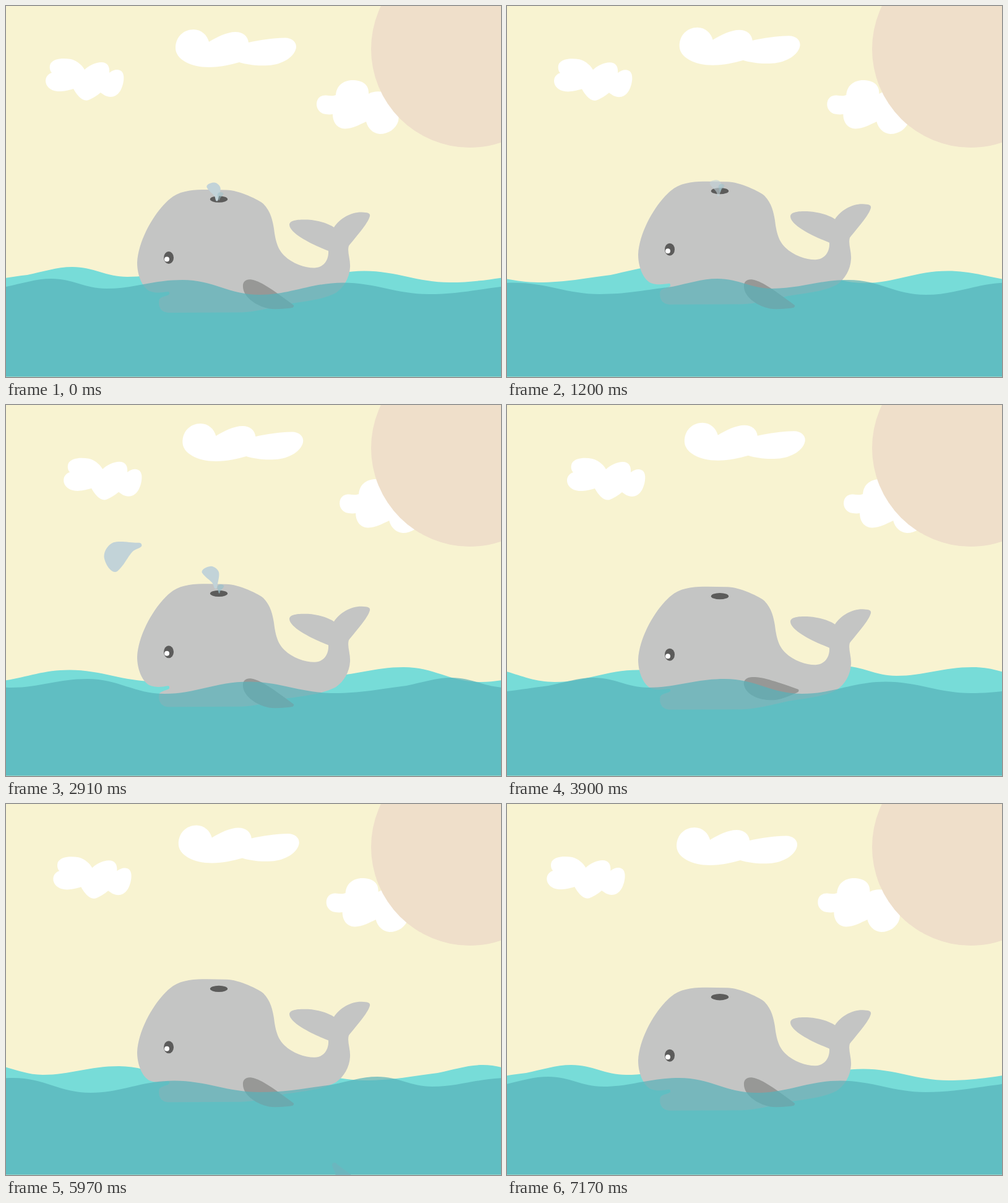
These frames come from a looping animation (800x600 px, 7200 ms). An HTML page:

```html
<!DOCTYPE html>
<html lang="en">
<head>
<meta charset="utf-8">
<title>Whale</title>
<style>
  html, body { margin: 0; height: 100%; overflow: hidden; background: #f8f3d1; }
  svg { display: block; width: 800px; height: 600px; }
</style>
</head>
<body>
<svg viewBox="0 0 800 600">
  <rect width="800" height="600" fill="#f8f3d1"/>
  <g fill="#fff">
    <path id="cloud1" d="M64,121C64,113 70,109 74,108C70,104 70,97 72,93C78,84 93,84 105,86C116,89 124,97 127,103C134,96 145,91 154,91C164,91 168,98 167,108C173,103 180,102 184,104C190,106 191,114 190,121C188,135 181,147 169,147C162,147 157,143 153,140C147,145 139,150 132,152.5C122,154 114,143 109,134C98,137 92,138.5 83,138C72,137 64,130 64,121Z"/>
    <path id="cloud2" d="M274,68C274,50 287,38 303,38C316,38 325,47 328,58C341,50 357,42 371,42C383,42 391,49 392,59C410,55 430,52 451,51.5C462,51.5 469,58 469,66C468,82 446,95 424,96C405,97 390,95 377,91C362,95 347,99 328,99C298,99 274,86 274,68Z"/>
    <path id="cloud3" d="M502,159C502,149 509,144 517,144.5C523,145 528,146 533,144C534,129 545,120 560,120C576,120 587,127 586,142C597,136 615,137 625,148C632,158 636,175 634,186C630,199 618,207 604,207C593,206 585,198 582,187C571,192 561,198 548,198.5C535,198 528,188 528,175C522,176 516,175 512,174C506,171 502,166 502,159Z"/>
  </g>
  <circle cx="749.5" cy="69.5" r="159.5" fill="#efdfca"/>
  <path id="back" fill="#77dcd8"/>
  <g id="whale">
    <path fill="#c4c5c4" d="M212,415C214,375 245,325 270,308C285,298 305,297 325,297L355,297.5C375,297 410,314 416,320C428,332 431,348 433,360C436,385 441,395 450,404C463,417 485,424 499,423.5C514,423 522,410 521,396C505,390 459,370 458,354C458,346 472,345 488,345.5C508,347 523,353 530,358C540,343 558,333 575,333.5C585,334 589,335 588,340C585,352 565,374 554,388C551,398 557,410 556,423C555,440 546,455 533,464C510,476 480,478 455,482C425,489 400,495 380,495.5L262,496C250,495 246,486 247.5,476C248,470 262,469 264,466Q264.5,462 262,462C252,463.5 242,465 232,461C220,455 212,435 212,415Z"/>
    <g fill="#5c5c5b">
      <ellipse cx="263" cy="407" rx="8" ry="10"/>
      <ellipse cx="344" cy="312.5" rx="14.2" ry="5.2"/>
    </g>
    <circle cx="260" cy="409.5" r="4" fill="#fff"/>
    <g id="spray"></g>
  </g>
  <path id="fin" fill="#979896" d="M383,454C382,445 389,441 397,442.5C410,445 425,454 465,484Q466,488 460,488.5C445,490 435,491 425,489.5C400,484 383,468 383,454Z"/>
  <path id="front" fill="#58b2ba" fill-opacity=".7"/>
</svg>
<script>
const LOOP = 7200;
const $ = id => document.getElementById(id);
const move = (el, x, y) => el.setAttribute('transform', `translate(${x} ${y})`);
const clamp = v => Math.max(0, Math.min(1, v));
// 0 -> 1 -> 0 in straight lines
const pingPong = (t, half) => 1 - Math.abs(1 - t / half % 2);

// One 800 px stretch of swell, repeated
const swell = 'c25,-5 48,-13 73,-13c35,0 54,16 89,16c45,0 74,-14 123,-14c50,0 75,24 125,24' +
  'c50,0 82,-19.5 135,-19.5c52,0 86,18.5 138,18.5c45,0 75,-7 117,-12';
const setWave = (id, bottom) =>
  $(id).setAttribute('d', `M-800,454${swell.repeat(3)}V${bottom}H-800Z`);
setWave('back', 618.5);
setWave('front', 599.5);

const DROP = 'M-1,45C-6,44 -2,33 -4,27C-7,18 -18,4 -21,-8C-24,-18 -8,-22 6,-19C16,-17 24,-4 23,6C21,18 8,33 4,43Q2,46 -1,45Z';
const jets = [
  { dir: -1, x: 339, reach: 365, life: 740, turn: 150, size: .36, fill: '#c2d3d8',
    starts: [-20, 1190, 2518, 2870, 3910, 5166, 6300] },
  { dir: 1, x: 346, reach: 205, life: 820, turn: 146, size: .16, fill: '#9cc1c9',
    starts: [-8, 1192, 2898, 3915, 5166, 6310] }
];
const drops = jets.flatMap(jet => jet.starts.map(start => {
  const el = document.createElementNS('http://www.w3.org/2000/svg', 'path');
  el.setAttribute('d', DROP);
  el.setAttribute('fill', jet.fill);
  $('spray').append(el);
  return { ...jet, start, el };
}));

function placeDrop({ el, dir, x, reach, life, turn, size, start }, t) {
  const age = t - start, p = age / life;
  const flying = p > 0 && p < 1.02;
  el.style.display = flying ? '' : 'none';
  if (!flying) return;
  const angle = 12 + turn * Math.sin(Math.min(p, 1) * Math.PI / 2) ** 1.2;
  const scale = Math.min(1, size + age * .0053);
  const px = x + dir * reach * p ** 1.3;
  const py = 312 - 630 * p + 978 * p * p;
  el.setAttribute('transform',
    `translate(${px} ${py}) rotate(${dir * angle}) scale(${-dir * scale} ${scale})`);
  el.setAttribute('opacity', clamp(age / 18));
}

function draw(now) {
  const t = now % LOOP;
  const drift = pingPong(t, 3600);
  move($('cloud1'), 36 * drift, drift);
  move($('cloud2'), 14 * drift, -10 * drift);
  move($('cloud3'), 46 * drift, 0);
  move($('whale'), 0, -20 * pingPong(t, 1800));
  move($('back'), (34 + t / 9) % 800, -19);
  move($('front'), t / 4.5 % 800, 0);
  const lift = clamp((t - 3000) / 1000) - clamp((t - 4850) / 1000);
  $('fin').setAttribute('transform', `rotate(${-19 * lift} 388 452)`);
  drops.forEach(d => placeDrop(d, t));
}

const begin = performance.now();
function frame() {
  draw(performance.now() - begin);
  requestAnimationFrame(frame);
}
frame();
</script>
</body>
</html>
```
